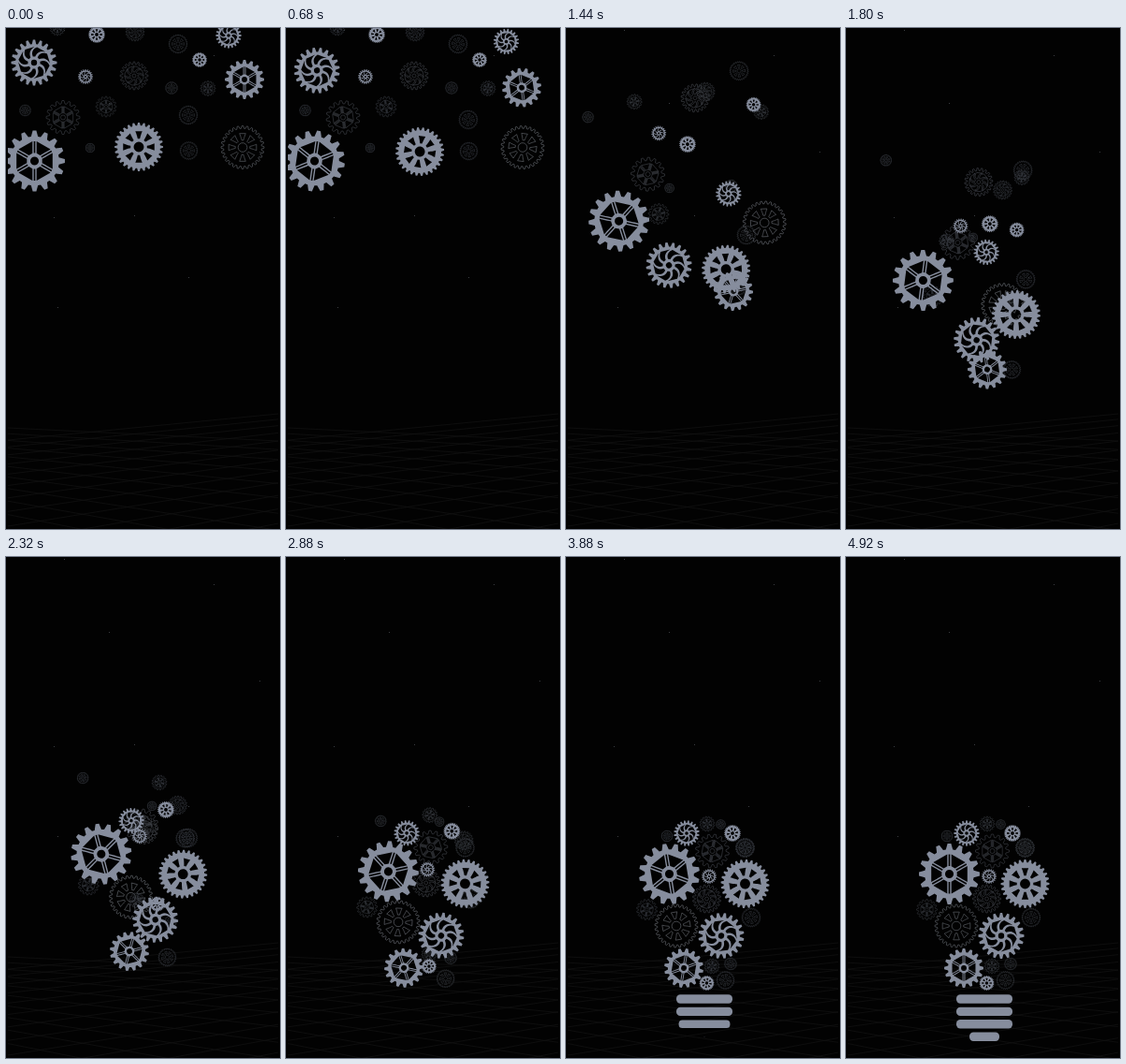
Write an HTML page with a canvas that moves like this. It is 293 by 535 pixels and loops after 4.96 s.

```html
<!DOCTYPE html>
<html lang="en">
<head>
<meta charset="utf-8">
<title>Gears forming a bulb</title>
<style>
html, body { margin: 0; width: 100%; height: 100%; overflow: hidden; background: #020202; }
canvas { display: block; width: 293px; height: 535px; }
</style>
</head>
<body>
<canvas id="stage" width="293" height="535"></canvas>
<script>
const LOOP = 4960, STEP = 40, HOLD = 120;
const FALL_START = 462, FALL_TIME = 2500;
const TAU = Math.PI * 2;
const ctx = document.getElementById('stage').getContext('2d');

// Gear designs in units of the outer radius; half(r) is a window's half angle.
const KINDS = {
  spoke: { teeth: 16, root: 0.81, hole: 0.14, n: 6, from: 0.26, to: 0.65,
           half: r => Math.PI / 6 - Math.asin(0.068 / r), twist: 0, slit: 0.025 },
  petal: { teeth: 28, root: 0.88, hole: 0.21, n: 8, from: 0.34, to: 0.66,
           half: r => 0.09 + 0.28 * (r - 0.2), twist: 0 },
  swirl: { teeth: 20, root: 0.81, hole: 0.13, n: 8, from: 0.27, to: 0.69,
           half: r => Math.PI / 8 - 0.055 / r, twist: 0.5 }
};

// kind, radius, start x, start y, end x, end y, delay
const SOLID = [
  ['spoke', 32.5, 30.5, 142, 110.5, 338.5, 280],
  ['spoke', 21, 255, 55, 126, 439, 0],
  ['petal', 26, 142, 127, 191.5, 349, 0],
  ['swirl', 24.5, 30, 37, 166, 404.5, 0],
  ['swirl', 13.7, 238, 8, 129, 295, 0],
  ['swirl', 8, 85, 52, 153, 341, 405],
  ['petal', 9, 97, 7, 178, 295, 200],
  ['petal', 8, 207, 34, 150.5, 455, 535]
];
const OUTLINE = [
  ['petal', 23, 253, 127.5, 118, 394, 305],
  ['spoke', 18, 61, 95.5, 156.5, 314, 330],
  ['swirl', 15, 137, 51, 150.5, 365, 605],
  ['spoke', 11, 107, 84, 86.5, 376.5, 215],
  ['petal', 10, 195, 93, 191.5, 310.5, 0],
  ['swirl', 10, 138, 4, 191.5, 310.5, 405],
  ['petal', 10, 184, 17, 198, 385, 600],
  ['petal', 9.5, 195.5, 131, 170.5, 452, 155],
  ['spoke', 8, 216, 64.5, 151, 285, 535],
  ['spoke', 8, 55, 0, 156, 437, 440],
  ['petal', 6.5, 177, 64, 176, 434.5, 325],
  ['petal', 6, 20.5, 88, 108, 298, 715],
  ['petal', 5, 90, 128, 165.5, 285.5, 335]
];
const STARS = [[62, 2], [222, 29], [110, 80], [271, 132],
               [51, 202], [137, 200], [195, 266], [55, 298]];

function polar(path, r, a, first) {
  path[first ? 'moveTo' : 'lineTo'](r * Math.cos(a), r * Math.sin(a));
}

function gearPath(kind, radius) {
  const k = KINDS[kind], unit = new Path2D(), path = new Path2D();
  const pitch = TAU / k.teeth;
  for (let i = 0; i < k.teeth; i++) {
    const a = i * pitch;
    polar(unit, k.root, a - pitch * 0.36, i === 0);
    polar(unit, 1, a - pitch * 0.15);
    polar(unit, 1, a + pitch * 0.15);
    polar(unit, k.root, a + pitch * 0.36);
  }
  unit.closePath();
  unit.moveTo(k.hole, 0);
  unit.arc(0, 0, k.hole, 0, TAU);
  for (let i = 0; i < k.n; i++) {
    const mid = i * TAU / k.n;
    for (const side of [-1, 1]) {
      for (let j = 0; j <= 6; j++) {
        const f = side < 0 ? j / 6 : 1 - j / 6;
        const r = k.from + (k.to - k.from) * f;
        polar(unit, r, mid + k.twist * f * f + side * k.half(r), side < 0 && j === 0);
      }
    }
    unit.closePath();
    if (k.slit) {
      const a = mid + Math.PI / k.n, w = k.slit;
      polar(unit, k.from, a - w / k.from, true);
      polar(unit, k.to, a - w / k.to);
      polar(unit, k.to, a + w / k.to);
      polar(unit, k.from, a + w / k.from);
      unit.closePath();
    }
  }
  path.addPath(unit, new DOMMatrix().scale(radius));
  return path;
}

// Timing curve cubic-bezier(x1, 0, x2, 1).
function bezierEase(x1, x2) {
  return u => {
    if (u <= 0) return 0;
    if (u >= 1) return 1;
    let lo = 0, hi = 1, s = 0.5;
    for (let i = 0; i < 24; i++) {
      s = (lo + hi) / 2;
      const x = 3 * (1 - s) * (1 - s) * s * x1 + 3 * (1 - s) * s * s * x2 + s * s * s;
      if (x < u) lo = s; else hi = s;
    }
    return s * s * (3 - 2 * s);
  };
}
const fall = bezierEase(0.365, 0.235);
const turn = bezierEase(0.4, 0.4);

function makeGear([kind, radius, x0, y0, x1, y1, delay], i) {
  const path = gearPath(kind, radius);
  const spin = i % 2 ? -Math.PI : Math.PI;
  return { radius, place(t, paint) {
    const p = fall((t - FALL_START - delay) / FALL_TIME);
    ctx.save();
    ctx.translate(x0 + (x1 - x0) * p, y0 + (y1 - y0) * p);
    ctx.rotate(spin * turn(t / LOOP));
    paint(path);
    ctx.restore();
  } };
}
const solid = SOLID.map(makeGear), outline = OUTLINE.map(makeGear);

function line(x1, y1, x2, y2) {
  ctx.beginPath();
  ctx.moveTo(x1, y1);
  ctx.lineTo(x2, y2);
  ctx.stroke();
}

function drawBackdrop() {
  ctx.fillStyle = '#020202';
  ctx.fillRect(0, 0, 293, 535);
  ctx.lineWidth = 0.7;
  ctx.strokeStyle = '#131414';
  for (let i = 0; i < 12; i++) {
    const d = 6.7 * i + 0.6 * i * i;
    line(2, 440 + d, 291, 412 + d * 0.8);
    line(2, 427 + d * 0.85, 291, 441 + d * 1.25);
  }
  ctx.fillStyle = '#3a3c40';
  for (const [x, y] of STARS) ctx.fillRect(x, y, 1, 1);
}

function drawBars(t) {
  for (let i = 0; i < 4; i++) {
    const s = fall((t - 3220 - i * 207) / 370);
    if (!s) continue;
    const y = 472 + 13.4 * i, w = (i < 3 ? 60 : 32) * s;
    ctx.beginPath();
    ctx.roundRect(148 - w / 2, y - 4.7 * s, w, 9.4 * s, 4.2 * s);
    ctx.fill();
  }
}

function draw(t) {
  drawBackdrop();
  ctx.save();
  ctx.beginPath();
  ctx.rect(2, 0, 289, 535);
  ctx.clip();
  for (const g of outline) {
    ctx.lineWidth = g.radius > 20 ? 0.7 : 0.5;
    ctx.strokeStyle = g.radius > 20 ? '#5a5d63' : g.radius > 12 ? '#4b4f57' : '#3a3e45';
    g.place(t, path => ctx.stroke(path));
  }
  ctx.fillStyle = '#868d9d';
  for (const g of solid) g.place(t, path => ctx.fill(path, 'evenodd'));
  drawBars(t);
  ctx.restore();
}

const start = performance.now();
function tick() {
  const t = (performance.now() - start) % LOOP;
  draw(t < HOLD ? 0 : Math.floor(t / STEP) * STEP);
  requestAnimationFrame(tick);
}
tick();
</script>
</body>
</html>
```
